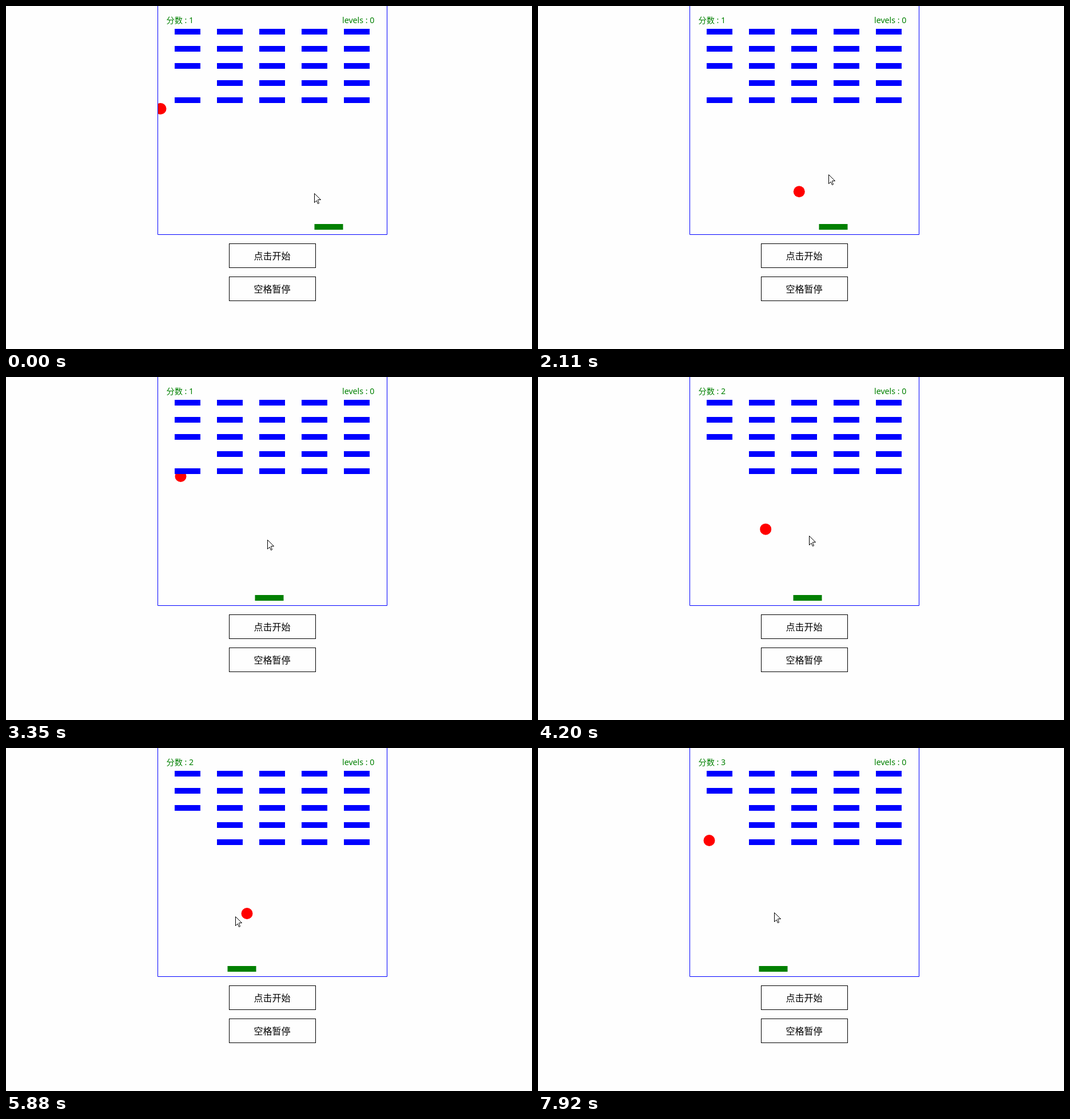
Recreate the animation shown at these times as an HTML page. Size 920 by 601 pixels, loop 8000 ms.

```html
<!DOCTYPE html>
<html lang="zh-CN">
<head>
<meta charset="utf-8">
<title>Breakout</title>
<style>
  html, body { margin: 0; width: 100%; height: 100%; overflow: hidden; background: #fefefe; }
  svg { display: block; width: 920px; height: 601px; }
  text { font-family: "Noto Sans", "Noto Sans CJK SC", "Noto Sans CJK", sans-serif; }
  .hud { font-size: 14.2px; fill: green; }
  .label { font-size: 16px; text-anchor: middle; }
  .button { fill: none; stroke: #000; }
</style>
</head>
<body>
<svg viewBox="0 0 920 601">
  <clipPath id="field"><rect x="266" width="400" height="400"/></clipPath>
  <path d="M265.5 0V400.5H666.5V0" fill="none" stroke="blue"/>
  <g clip-path="url(#field)">
    <circle id="ball" r="10" fill="red"/>
    <rect id="paddle" y="382" width="50" height="10" fill="green"/>
    <g id="bricks" fill="blue"></g>
    <text id="score" class="hud" x="280.5" y="30"></text>
    <text class="hud" x="588" y="30">levels : 0</text>
  </g>
  <rect class="button" x="390.5" y="416.5" width="151" height="42"/>
  <text class="label" x="465.5" y="444">点击开始</text>
  <rect class="button" x="390.5" y="474.5" width="151" height="42"/>
  <text class="label" x="465.5" y="502">空格暂停</text>
  <path id="cursor" d="M.5.5V16.5L4 13 6.5 18.5 8.5 17.5 6.5 12.5V11.5H11.5Z" fill="#fff" stroke="#000"/>
</svg>
<script>
const LOOP = 8000;
const STEP = 139;        // ms between screen refreshes
const LEAD = 45;         // ms already elapsed in the first refresh
const PADDLE_LAG = 0.5;  // steps the paddle trails behind the cursor

// Bounces of the ball: [step, x, y]
const ballPath = [
  [0, 270.5, 180], [12.22, 503.5, 372], [24, 305.5, 174], [36.82, 503.5, 372],
  [51.54, 270.5, 139], [53.4, 300.5, 114], [55.2, 270.5, 138], [57, 299.5, 162]
];
// Turns of the hand: [step, position]
const handX = [
  [-0.5, 564.5], [0, 539], [6.75, 460], [14.6, 518], [16.8, 463], [23.5, 460.5], [24, 457],
  [26.6, 457], [37.5, 511.5], [42.4, 391], [46, 410], [56, 410], [57, 413]
];
const handY = [[0, 328], [7, 303], [24, 285], [35, 272], [42, 295], [48, 288]];

// Step at which a brick of the first column disappears, by row
const breaks = { 2: 54, 3: 0, 4: 25 };

const [ball, paddle, bricks, score, cursor] =
  ["ball", "paddle", "bricks", "score", "cursor"].map(id => document.getElementById(id));

function set(node, attributes) {
  for (const name in attributes) node.setAttribute(name, attributes[name]);
  return node;
}

function sample(path, at) {
  const next = path.findIndex(key => key[0] > at);
  if (next < 0) return path[path.length - 1].slice(1);
  const [from, to] = [path[next - 1], path[next]];
  const k = (at - from[0]) / (to[0] - from[0]);
  return from.slice(1).map((value, i) => value + (to[i + 1] - value) * k);
}

const breakable = [];
for (let row = 0; row < 5; row++) {
  for (let col = 0; col < 5; col++) {
    const brick = document.createElementNS("http://www.w3.org/2000/svg", "rect");
    set(brick, { x: 295 + 74 * col, y: 40 + 30 * row, width: 45, height: 10 });
    bricks.append(brick);
    if (col === 0 && row in breaks) breakable.push({ brick, at: breaks[row] });
  }
}

function render(time) {
  const step = Math.floor((time + LEAD) / STEP);
  const [x, y] = sample(ballPath, step);
  const [cursorX] = sample(handX, step);
  const [cursorY] = sample(handY, step);
  const [trailX] = sample(handX, step - PADDLE_LAG);
  set(ball, { cx: x, cy: y });
  set(paddle, { x: Math.round(trailX) - 25.5 });
  set(cursor, { transform: `translate(${Math.round(cursorX)} ${Math.round(cursorY)})` });
  let broken = 0;
  for (const { brick, at } of breakable) {
    const gone = step >= at;
    set(brick, { visibility: gone ? "hidden" : "visible" });
    broken += gone;
  }
  score.textContent = `分数 : ${broken}`;
}

const start = performance.now();
function tick() {
  render((performance.now() - start) % LOOP);
  requestAnimationFrame(tick);
}
tick();
</script>
</body>
</html>
```
